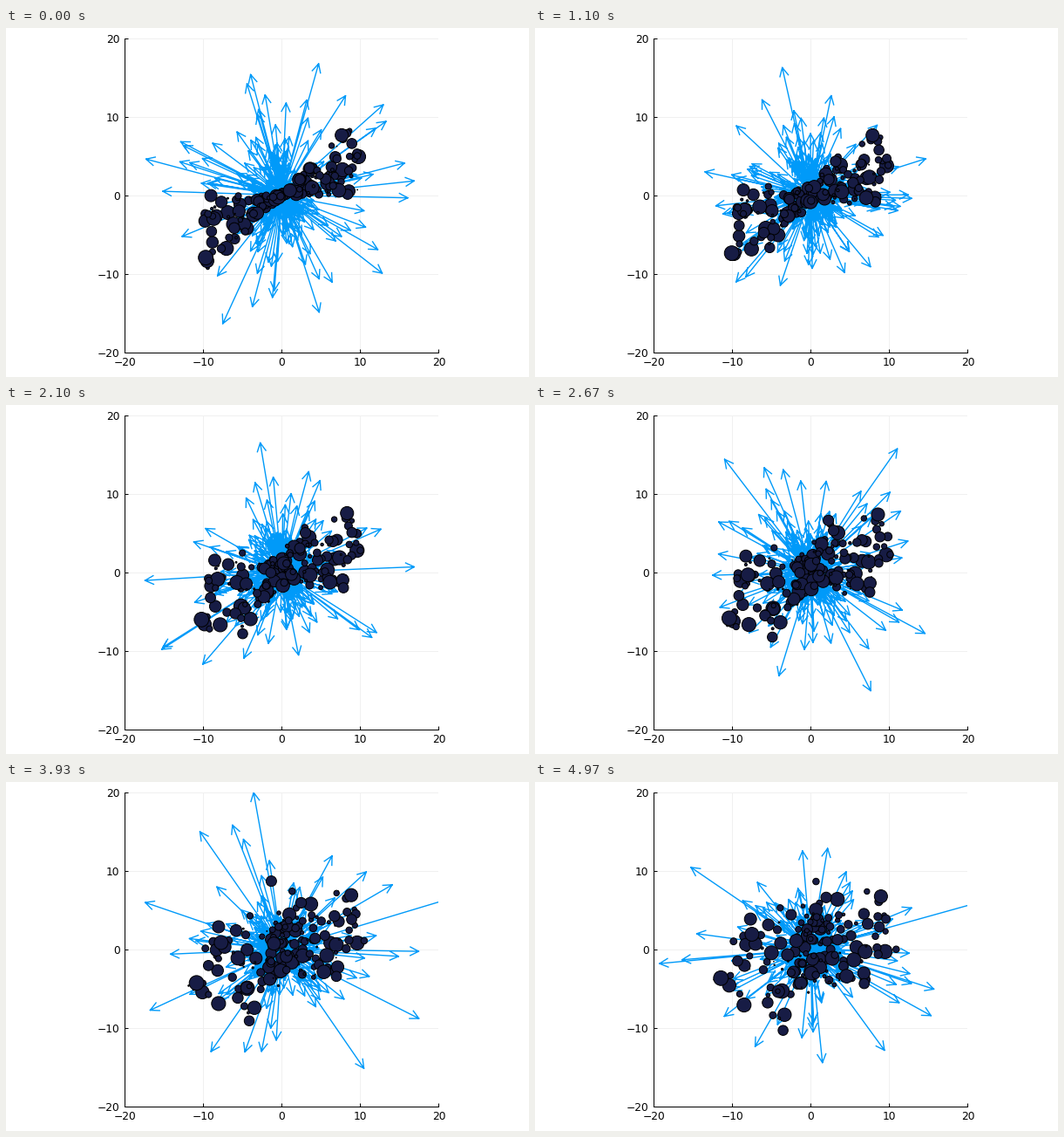
A matplotlib script for the animation above (5010 ms loop, 600x400 px).

```python
import numpy as np
import matplotlib.pyplot as plt
from matplotlib.animation import FuncAnimation

W, H, DPI = 600, 400, 100
FRAMES, STEP = 150, 33.4
PX = 72 / DPI
BLUE, NAVY = "#009af9", "#171c45"

plt.rcParams["font.family"] = "DejaVu Sans"
rng = np.random.default_rng(5)


def turn(a):
    return np.exp(1j * a)


# Positions are complex numbers; bodies start in the wedge between y = 0 and y = x
N = 180
x0 = rng.uniform(-9.8, 9.8, N)
u = rng.uniform(0, 1, N)
radius = rng.uniform(0.3, 8.4, N)
x0[-1], u[-1], radius[-1] = -9.7, 0.82, 8.4  # the outermost body
start = x0 + 1j * x0 * u

# Inner bodies fan out, outer ones orbit clockwise
side = np.sign(x0)
outer = np.clip((abs(x0) - 6) / 2.5, 0, 1)
vx = side * (-0.5 + (0.3 + 0.5 * outer) * u)
vy = side * (1.5 * (1 - outer) * (u - 0.5) - 0.8 * outer)
drift = vx + 1j * vy + rng.normal(0, 0.19, N) + 1j * rng.normal(0, 0.19, N)
spin = rng.uniform(1, 3.5, N)
phase = rng.uniform(0, 2 * np.pi, N)
sway = rng.uniform(0, 0.3, N)
mass = np.append(radius, 6) ** 2

# Close encounters: short strong pulls that rise, swing and fade
M = 110
peak_t = rng.uniform(-0.2, 5.2, M)
peak = rng.uniform(10, 24, M) * turn(rng.uniform(0, 2 * np.pi, M))
swing = rng.uniform(-1.2, 0.6, M)


def flung(t):
    """One body is thrown over the top and falls back."""
    x = -0.1 + 2.4 * np.cos(np.clip(1.5 * (t - 2.5), 0, np.pi))
    y = max(2, 8.9 - 2.5 * (t - 3.6) ** 2)
    return x + 1j * y


def bodies(t):
    wobble = sway * (turn(phase - spin * t) - turn(phase))
    return np.append(start + drift * t + wobble, flung(t))


def pulls(z, t):
    d = z[None, :] - z[:, None]
    acc = (mass * d / (abs(d) ** 2 + 0.006) ** 1.5).sum(axis=1)
    size = abs(acc)
    length = (5.6 - 0.25 * t) * np.sqrt(size / np.median(size))
    gravity = acc / size * 22 * np.tanh(length / 22)
    dt = t - peak_t
    near = peak * turn(swing * dt) / (1 + (dt / 0.3) ** 2)
    return np.concatenate([gravity, near])


def arrow_path(tips):
    back = -1.2 * tips / abs(tips)
    wing = turn(np.radians(27))
    gap = np.full(len(tips), np.nan + 0j)
    parts = [0 * tips, tips, gap, tips + back * wing, tips, tips + back / wing, gap]
    path = np.column_stack(parts).ravel()
    return path.real, path.imag


fig = plt.figure(figsize=(W / DPI, H / DPI), dpi=DPI, facecolor="white")
ax = fig.add_axes([136.4 / W, 28.4 / H, 360 / W, 360 / H])
ax.set(xlim=(-20, 20), ylim=(-20, 20))
ticks = range(-20, 21, 10)
ax.set_xticks(ticks)
ax.set_yticks(ticks)
ax.tick_params(direction="in", length=4 * PX, width=PX, labelsize=8.8)
ax.tick_params(axis="x", pad=4.2)
ax.tick_params(axis="y", pad=4.2)
ax.grid(color="#f0f0f0", linewidth=PX)
ax.set_axisbelow(True)
ax.spines[["top", "right"]].set_visible(False)
ax.spines[["left", "bottom"]].set_linewidth(PX)

arrows, = ax.plot([], [], color=BLUE, lw=1, zorder=3)
dots = ax.scatter(np.zeros(N + 1), np.zeros(N + 1), s=4 * mass * PX ** 2, c=NAVY,
                  edgecolors="black", linewidths=PX, zorder=4)


def draw(i):
    t = i * STEP / 1000
    z = bodies(t)
    dots.set_offsets(np.column_stack([z.real, z.imag]))
    arrows.set_data(*arrow_path(pulls(z, t)))
    return arrows, dots


anim = FuncAnimation(fig, draw, frames=FRAMES, interval=STEP, repeat=True)
plt.show()
```
